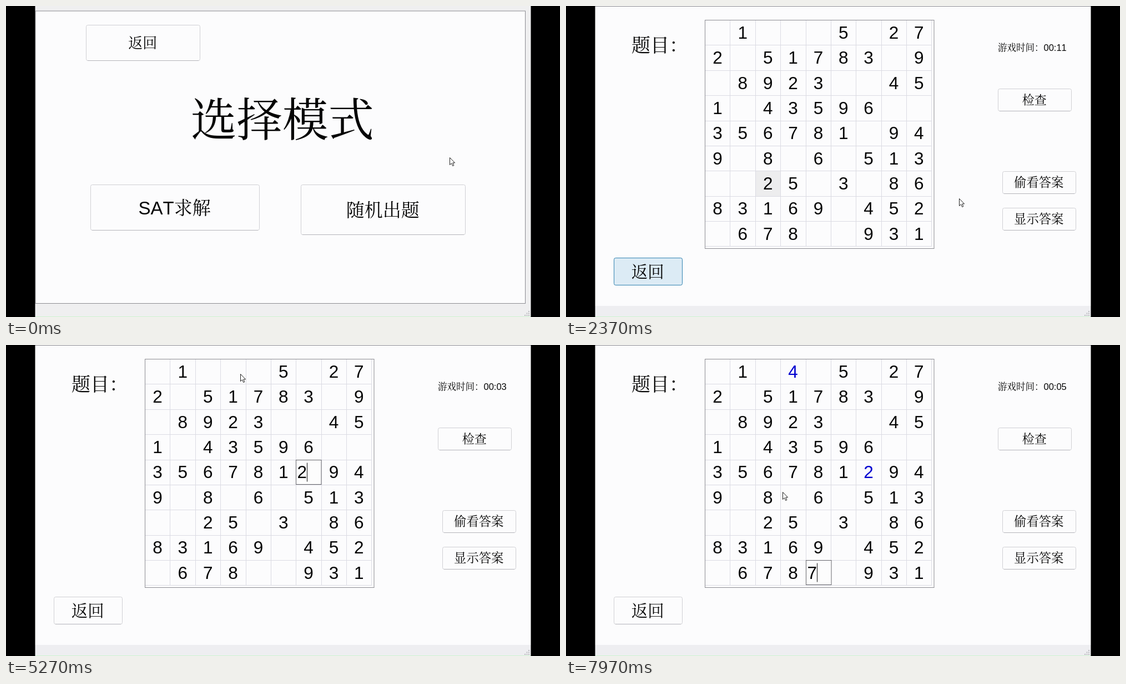
Write an HTML page that moves like this. It is 998 by 561 pixels and loops after 8 s.

```html
<!DOCTYPE html>
<html lang="zh-CN">
<head>
<meta charset="utf-8">
<title>数独</title>
<style>
  html, body { margin: 0; width: 100%; height: 100%; overflow: hidden; background: #000; }
  svg { display: block; width: 100vw; height: 100vh; }
  text {
    font-family: "Liberation Sans", "Noto Serif CJK SC", "Noto Sans CJK SC", "Noto Sans CJK", sans-serif;
    font-weight: 200;
    font-kerning: none;
    fill: #050505;
    white-space: pre;
  }
  .mid { text-anchor: middle; }
  .digit { font-size: 31.5px; font-weight: 400; }
  .blue { fill: #0000d0; }
  .line { fill: none; stroke: #8c8c92; }
  .cells { fill: none; stroke: #dbdbe3; }
  .button { fill: #fcfcfd; stroke: #d0d0d4; }
  .edge { stroke: #b4b4ba; }
  .hover { fill: #dbeaf5; stroke: #2a80b0; opacity: 0; }
</style>
</head>
<body>
<svg id="stage" viewBox="0 0 998 561" preserveAspectRatio="none"></svg>
<script>
const LOOP = 8000;
const CELL = 45.38, LEFT = 250.5, TOP = 25.5;
const MODE_END = 1300, LEVEL_END = 2350;
const puzzle = ["010005027", "205178309", "089230045", "104359600", "356781094",
                "908060513", "002503086", "831690452", "067800931"];

const entries = [
  { row: 4, col: 6, digit: 2, open: 3450, typed: 4050, done: 5400 },
  { row: 0, col: 3, digit: 4, open: 5400, typed: 5800, done: 6600 },
  { row: 8, col: 4, digit: 7, open: 6600, typed: 6890, done: LOOP }
];

// time, x, y of the pointer tip
const pointerPath = [
  [120, 799, 273], [800, 726, 343], [1250, 726, 343], [1600, 708, 347],
  [2350, 708, 347], [3080, 545, 215], [3400, 548, 222], [3700, 548, 222],
  [4400, 533, 127], [4900, 533, 127], [5350, 412, 45], [5750, 412, 45],
  [6100, 459, 119], [6220, 459, 119], [6620, 452, 412], [7050, 452, 412],
  [7750, 390, 265]
];

const rect = (x, y, w, h, attrs) =>
  `<rect x="${x}" y="${y}" width="${w}" height="${h}" ${attrs}/>`;

const label = (text, x, y, size, cls = "mid") =>
  `<text x="${x}" y="${y + size * 0.38}" font-size="${size}" class="${cls}">${text}</text>`;

function button(text, x1, y1, x2, y2, size, id) {
  const box = [x1 + 0.5, y1 + 0.5, x2 - x1 - 1, y2 - y1 - 1];
  return rect(...box, 'rx="3" class="button"') +
    `<path d="M${x1 + 3} ${y2 - 0.5}H${x2 - 3}" class="edge"/>` +
    (id ? rect(...box, `rx="3" class="hover" id="${id}"`) : "") +
    label(text, (x1 + x2) / 2 - 0.8, (y1 + y2) / 2 - 0.5, size);
}

const digitAt = (row, col, digit, attrs = "") =>
  `<text x="${273 + col * 45.35}" y="${59 + row * 45.35}" class="digit mid ${attrs}">${digit}</text>`;

function grid() {
  let lines = "", digits = "";
  for (let i = 1; i <= 9; i++) {
    const x = Math.floor(LEFT + i * CELL) + 0.5, y = Math.floor(TOP + i * CELL) + 0.5;
    lines += `M${x} 26V434M251 ${y}H659`;
  }
  puzzle.forEach((line, row) => [...line].forEach((d, col) => {
    if (d !== "0") digits += digitAt(row, col, d);
  }));
  return rect(342, 298, 45, 45, 'fill="#ededee" id="selected"') +
    `<path d="${lines}" class="cells"/>` +
    rect(250.5, 25.5, 412.5, 412, 'class="line"') + digits;
}

function entryMarkup({ row, col, digit }, i) {
  const x = Math.floor(LEFT + col * CELL) + 0.5, y = Math.floor(TOP + row * CELL) + 0.5;
  return `<g id="editor${i}">${rect(x, y, 45.5, 44, 'fill="#fdfdfd" stroke="#66666c"')}
    <text id="typed${i}" class="digit" x="${x + 2}" y="${59 + row * 45.35}">${digit}</text>
    <path id="caret${i}" d="M0 ${y + 5}v34" stroke="#111" data-x="${x}"/></g>
    <g id="final${i}">${digitAt(row, col, digit, "blue")}</g>`;
}

function grip() {
  let dots = "";
  for (let r = 0; r < 3; r++)
    for (let c = 2 - r; c < 3; c++) dots += rect(934 + c * 3.5, 550 + r * 3.5, 2, 2, 'fill="#b9b9bd"');
  return dots;
}

const statusBar = rect(52, 541, 894, 20, 'fill="#eeeef1"');

stage.innerHTML = `
  ${rect(52, 0, 894, 561, 'fill="#fcfcfd"')}
  <g id="mode">
    ${rect(52, 0, 894, 561, 'fill="#efeff0"')}
    ${rect(53, 9, 882.5, 527.5, 'fill="#fcfcfd" stroke="#8c8c92"')}
    ${button("返回", 144, 34, 350, 99, 26)}
    ${label("选择模式", 498, 204, 82.5)}
    ${button("SAT求解", 152, 322, 457, 405, 33)}
    ${button("随机出题", 531, 322, 828, 413, 33, "random")}
  </g>
  <g id="level">
    ${rect(52, 0, 9.5, 561, 'fill="#f1f1f3"')}${statusBar}
    <path d="M61.5 0V541" class="line"/>
    ${button("返回", 135, 34, 276, 83, 24.5)}
    ${label("选择难度", 522.5, 155, 82.5)}
    ${button("简单", 284, 298, 474, 363, 30)}
    ${button("基础", 564, 297, 746, 372, 30, "basic")}
    ${button("中级", 284, 421, 474, 479, 30)}
    ${button("专家", 564, 413, 746, 479, 30)}
  </g>
  <g id="game">
    ${statusBar}<path d="M52 .5H946" class="line"/>
    ${label("题目：", 118, 70, 34, "")}
    ${grid()}${entries.map(entryMarkup).join("")}
    ${label("游戏时间：", 778, 75, 16.5, "")}
    <text id="clock" x="860.5" y="81" font-size="16.5"></text>
    ${button("检查", 778, 149, 911, 190, 22)}
    ${button("偷看答案", 786, 298, 919, 339, 22.3)}
    ${button("显示答案", 786, 364, 919, 405, 22.3)}
    ${button("返回", 86, 454, 210, 504, 29.5, "back")}
  </g>
  ${grip()}
  ${rect(52, 560, 894, 1, 'fill="#cdf3cf"')}
  ${rect(0, 0, 52.5, 561, "")}${rect(945.5, 0, 52.5, 561, "")}
  <path id="pointer" d="M.5 .5V13.5L3.6 10.7L5.7 15.5L7.8 14.6L5.8 9.9H9.6Z" fill="#fff" stroke="#222"/>`;

const el = id => document.getElementById(id);
const show = (id, on) => el(id).setAttribute("display", on ? "inline" : "none");
const ramp = (t, start, length) => Math.min(1, Math.max(0, (t - start) / length));
const ease = k => k * k * (3 - 2 * k);

function pointerAt(t) {
  const next = pointerPath.findIndex(p => p[0] > t);
  if (next === 0) return pointerPath[0].slice(1);
  if (next < 0) return pointerPath.at(-1).slice(1);
  const [t0, x0, y0] = pointerPath[next - 1], [t1, x1, y1] = pointerPath[next];
  const k = ease((t - t0) / (t1 - t0));
  return [x0 + (x1 - x0) * k, y0 + (y1 - y0) * k];
}

function drawEntry({ open, typed, done }, i, t) {
  const hasDigit = t >= typed, caret = el("caret" + i);
  show("editor" + i, t >= open && t < done);
  show("final" + i, t >= done);
  show("typed" + i, hasDigit);
  show(caret.id, (t - (hasDigit ? typed : open)) % 1060 < 530);
  caret.setAttribute("transform", `translate(${+caret.dataset.x + (hasDigit ? 20 : 4)})`);
}

function draw(t) {
  show("mode", t < MODE_END);
  show("level", t >= MODE_END && t < LEVEL_END);
  show("game", t >= LEVEL_END);
  el("random").style.opacity = ramp(t, 560, 240);
  el("basic").style.opacity = ramp(t, MODE_END, 240);
  el("back").style.opacity = 1 - ramp(t, LEVEL_END, 350);
  show("selected", t < entries[0].open);
  const seconds = t < 3160 ? 11 : 1 + Math.floor((t - 3160) / 965);
  el("clock").textContent = "00:" + String(seconds).padStart(2, "0");
  entries.forEach((entry, i) => drawEntry(entry, i, t));
  el("pointer").setAttribute("transform", `translate(${pointerAt(t).map(Math.round)})`);
}

const start = performance.now();
function tick() {
  draw((performance.now() - start) % LOOP);
  requestAnimationFrame(tick);
}
tick();
</script>
</body>
</html>
```
